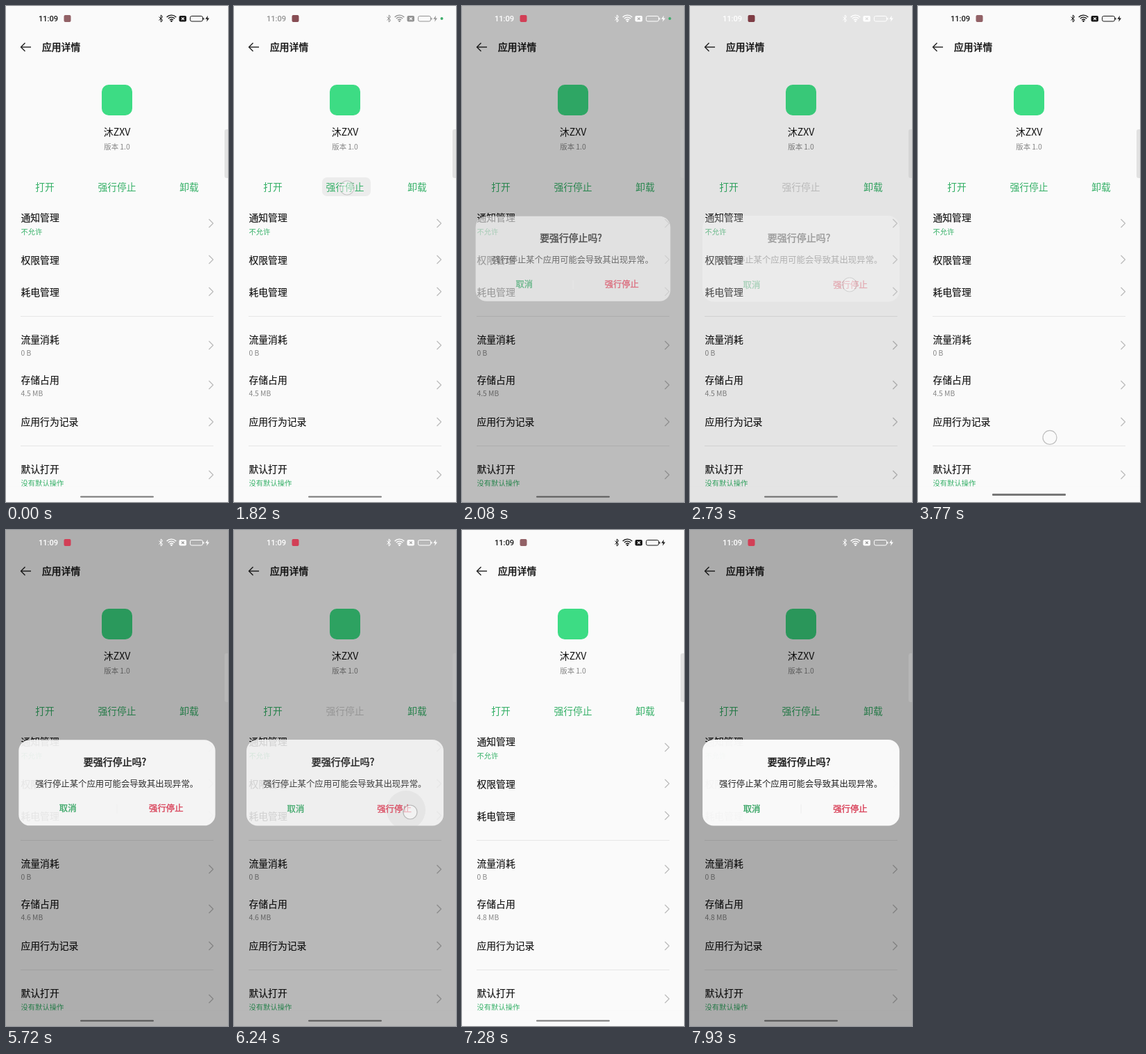
Write an HTML page with a canvas that moves like this. It is 320 by 712 pixels and loops after 8000 ms.

```html
<!DOCTYPE html>
<html lang="zh-CN">
<head>
<meta charset="utf-8">
<title>应用详情</title>
<style>
html, body { margin: 0; width: 100%; height: 100%; overflow: hidden; background: #fafafa; }
canvas { display: block; width: 320px; height: 712px; }
</style>
</head>
<body>
<canvas id="stage"></canvas>
<script>
const W = 320, H = 712, LOOP = 8000;
const canvas = document.getElementById('stage');
const g = canvas.getContext('2d');
const dpr = window.devicePixelRatio || 1;
canvas.width = W * dpr;
canvas.height = H * dpr;

const CJK = '"Noto Sans CJK SC", "Noto Sans CJK", sans-serif';
const GREEN = '#35b067', INK = '#111', GREY = '#858585';
const LABEL = 13.8, NOTE = 10.3;

// Dialog openings and closings, and when the stop button comes back
const CYCLES = [
  { open: 1850, close: 2515, revive: 3200 },
  { open: 5434, close: 6190, revive: 6800 },
  { open: 7635, close: LOOP, revive: LOOP }
];
const FADE = 300;

// Finger contacts: start, end, x, y, upward speed in px per ms
const TOUCHES = [
  [1500, 1800, 163, 261, 0],
  [2380, 2690, 230, 400, 0],
  [3640, 3860, 190, 698, 0.6],
  [5280, 5430, 170, 247, 0],
  [6080, 6300, 254, 405, 0],
  [7450, 7620, 165, 258, 0]
];

const ROWS = [
  ['通知管理', 304, 312], ['权限管理', 365, 364], ['耗电管理', 411, 410],
  ['流量消耗', 479, 487], ['存储占用', 537, 544], ['应用行为记录', 597, 597],
  ['默认打开', 665, 673]
];

const clamp = v => Math.max(0, Math.min(1, v));
const ramp = (t, a, b) => clamp((t - a) / (b - a));
const pulse = (t, a, b, c, d) => ramp(t, a, b) * (1 - ramp(t, c, d));
const mix = (a, b, k) => 'rgb(' + a.map((v, i) => Math.round(v + (b[i] - v) * k)).join(',') + ')';

// heft thickens the strokes of regular glyphs to a medium weight
function text(s, x, cy, size, color, { align = 'left', weight = 400, heft = 0, font = CJK, rise = 0.37 } = {}) {
  g.font = `${weight} ${size}px ${font}`;
  g.textAlign = align;
  g.fillStyle = color;
  g.fillText(s, x, cy + size * rise);
  if (!heft) return;
  g.strokeStyle = color;
  g.lineWidth = heft;
  g.lineJoin = 'round';
  g.strokeText(s, x, cy + size * rise);
}

function line(points, color, width) {
  g.beginPath();
  points.forEach(([x, y], i) => i ? g.lineTo(x, y) : g.moveTo(x, y));
  g.strokeStyle = color;
  g.lineWidth = width;
  g.stroke();
}

function box(x, y, w, h, r, color) {
  g.beginPath();
  g.roundRect(x, y, w, h, r);
  g.fillStyle = color;
  g.fill();
}

function disc(x, y, r, color) {
  g.beginPath();
  g.arc(x, y, r, 0, Math.PI * 2);
  g.fillStyle = color;
  g.fill();
}

function stateAt(t) {
  const s = { shade: 0, dialog: 0, scale: 1, status: 0, stopped: false };
  for (const { open, close, revive } of CYCLES) {
    if (t < open - 130 || t > Math.max(revive, close + 500)) continue;
    const enter = ramp(t, open, open + FADE);
    const stay = 1 - ramp(t, close, close + FADE);
    s.shade = enter * stay;
    s.dialog = enter * enter * stay;
    s.scale = 0.95 + 0.05 * enter;
    s.status = pulse(t, open - 130, open + 60, close + 230, close + 430);
    s.stopped = t >= close && t < revive;
  }
  return s;
}

function drawPage(t, stopped) {
  g.fillStyle = '#fafafa';
  g.fillRect(0, 0, W, H);

  line([[36, 59], [21.5, 59]], '#222', 1.4);
  line([[27.5, 53], [21.5, 59], [27.5, 65]], '#222', 1.4);
  text('应用详情', 52, 59, LABEL, INK, { heft: 0.45 });

  box(138, 113, 44, 44, 10, '#3ddc84');
  text('沐ZXV', 160, 181, 14, INK, { align: 'center' });
  text('版本 1.0', 160, 202, 10.4, GREY, { align: 'center' });

  const press = pulse(t, 1560, 1700, 1860, 2000);
  if (press) box(127, 246, 70, 27, 7, `rgba(0,0,0,${0.055 * press})`);
  text('打开', 56, 260, LABEL, GREEN, { align: 'center' });
  text('强行停止', 160, 260, LABEL, stopped ? '#ccc' : GREEN, { align: 'center' });
  text('卸载', 264, 260, LABEL, GREEN, { align: 'center' });

  for (const [label, y, arrow] of ROWS) {
    text(label, 21.5, y, LABEL, INK, { heft: 0.15 });
    line([[292.5, arrow - 6], [298.5, arrow], [292.5, arrow + 6]], '#bdbdbd', 1.3);
  }
  const size = t < 4900 ? '4.5' : t < 7150 ? '4.6' : '4.8';
  text('不允许', 21.5, 324, NOTE, GREEN);
  text('0 B', 21.5, 498, NOTE, GREY);
  text(size + ' MB', 21.5, 556, NOTE, GREY);
  text('没有默认操作', 21.5, 685, NOTE, GREEN);
  line([[21, 445.5], [299, 445.5]], '#e6e6e6', 1);
  line([[21, 631.5], [299, 631.5]], '#e6e6e6', 1);

  // The list ends above the home bar, which lifts while swiped
  g.fillStyle = '#fafafa';
  g.fillRect(0, 689.5, W, H - 689.5);
  const lift = pulse(t, 3660, 3760, 3860, 3960);
  box(107, 703.5 - 3.5 * lift, 106, 2 + lift, 1, '#777');
}

function drawDialog(alpha, scale, t) {
  g.save();
  g.globalAlpha = alpha;
  g.translate(160, 362.5);
  g.scale(scale, scale);
  g.translate(-160, -362.5);
  box(18, 301, 284, 123.5, 16, '#fbfbfb');
  g.clip();
  text('要强行停止吗?', 157, 333, 14, INK, { align: 'center', heft: 0.5 });
  text('强行停止某个应用可能会导致其出现异常。', 42, 364.5, 12.4, '#1c1c1c');
  line([[160, 394], [160, 407]], '#eee', 1);
  text('取消', 89, 400, 12.4, '#35a463', { align: 'center', heft: 0.4 });
  const ripple = pulse(t, 6090, 6200, 6260, 6400);
  if (ripple) disc(248, 402, 28 * ripple, 'rgba(0,0,0,.05)');
  text('强行停止', 231, 400, 12.4, '#d83c54', { align: 'center', heft: 0.4 });
  g.restore();
}

function drawStatus(k, shade, t) {
  const c = mix([24, 24, 24], [255, 255, 255], k);
  text('11:09', 47, 18.3, 11.1, c, { weight: 500, font: 'Roboto, sans-serif', rise: 0.355 });
  box(83.5, 13, 10, 10, 2, shade > 0.6 ? '#d23f56' : mix([146, 97, 102], [126, 60, 68], k));

  // Bluetooth
  line([[220.5, 15.7], [226, 20.5], [223.3, 23], [223.3, 13], [226, 15.5], [220.5, 20.5]], c, 1);
  // Wi-Fi
  for (const r of [10, 7, 4]) {
    g.beginPath();
    g.arc(238.5, 22.5, r - 0.6, -Math.PI * 0.76, -Math.PI * 0.24);
    g.strokeStyle = c;
    g.lineWidth = 1.4;
    g.stroke();
  }
  disc(238.5, 21.7, 1.3, c);
  // No SIM
  box(249.5, 14, 10.5, 8.5, 2, c);
  const hole = mix([250, 250, 250], [150, 150, 150], shade);
  line([[253, 16.5], [256.8, 20]], hole, 1.1);
  line([[256.8, 16.5], [253, 20]], hole, 1.1);
  // Battery and bolt
  g.beginPath();
  g.roundRect(265.5, 14.5, 18, 7.5, 2.2);
  g.strokeStyle = c;
  g.lineWidth = 1;
  g.stroke();
  box(284.3, 16.8, 1.2, 3, 0.6, c);
  g.beginPath();
  [[291, 13.8], [287.3, 18.8], [289.9, 18.8], [289.2, 22.8], [293, 17.5], [290.4, 17.5]]
    .forEach(([x, y]) => g.lineTo(x, y));
  g.fillStyle = c;
  g.fill();

  if (t >= 1300 && t < 2300) disc(299.5, 18, 2, '#3fae6c');
}

function drawTouch(t) {
  for (const [start, end, x, y, speed] of TOUCHES) {
    const a = pulse(t, start, start + 60, end, end + 80);
    if (!a) continue;
    g.save();
    g.globalAlpha = a;
    disc(x, y - speed * (t - start), 10, 'rgba(250,250,250,.6)');
    g.strokeStyle = 'rgba(150,150,150,.6)';
    g.lineWidth = 1.2;
    g.stroke();
    g.restore();
  }
}

function draw(t) {
  const { shade, dialog, scale, status, stopped } = stateAt(t);
  g.setTransform(dpr, 0, 0, dpr, 0, 0);
  drawPage(t, stopped);
  if (shade) {
    g.fillStyle = `rgba(0,0,0,${0.32 * shade})`;
    g.fillRect(0, 0, W, H);
    drawDialog(dialog, scale, t);
  }
  box(315, 177, 8, 70, 3, 'rgba(196,196,196,.45)');
  drawStatus(status, shade, t);
  drawTouch(t);
}

const began = performance.now();
function tick() {
  draw((performance.now() - began) % LOOP);
  requestAnimationFrame(tick);
}
tick();
</script>
</body>
</html>
```
